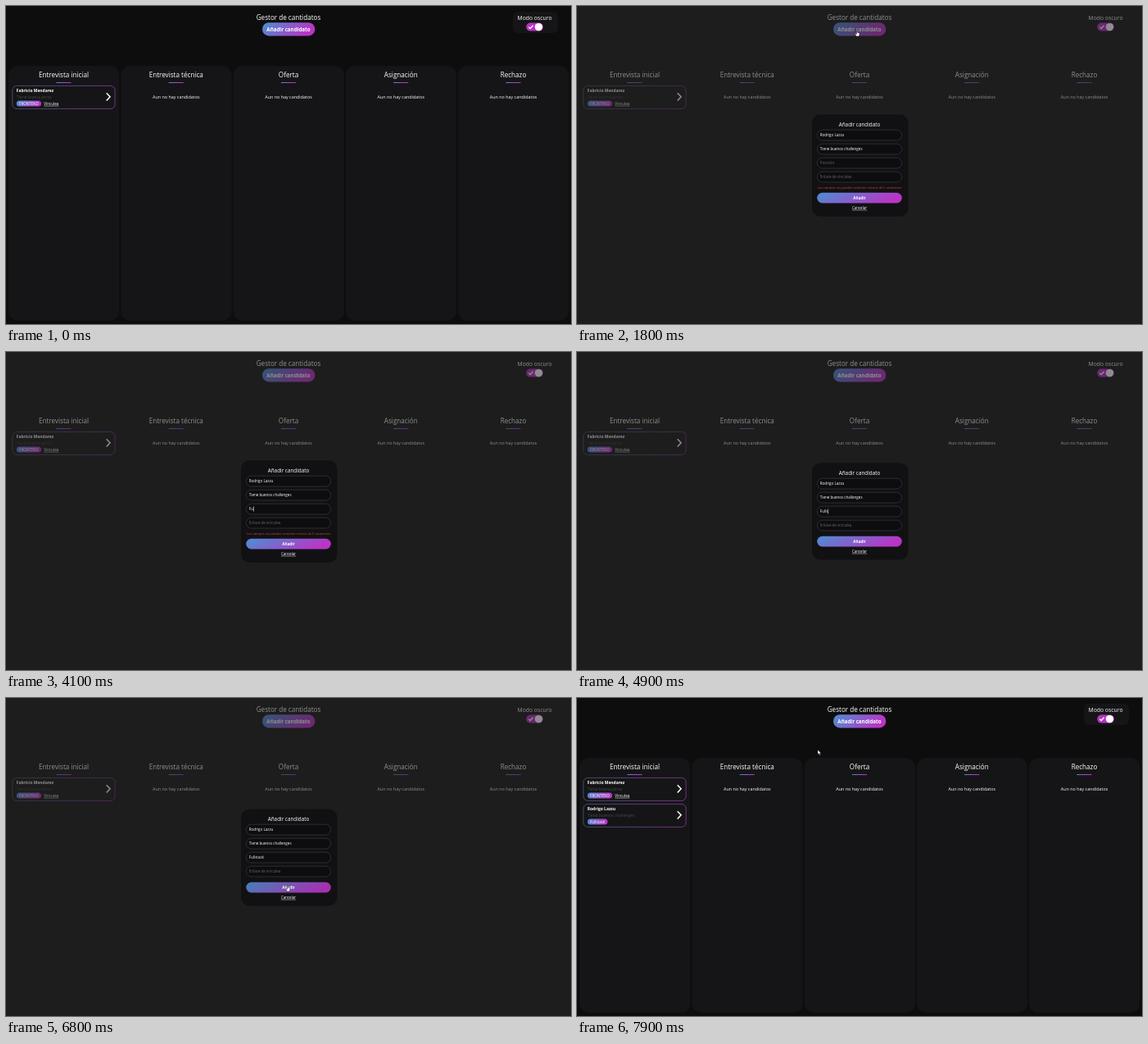
Animation, 690 px wide and 388 px high, one loop 8000 ms. Source, as an HTML page:

```html
<!DOCTYPE html>
<html lang="es">
<meta charset="utf-8">
<title>Gestor de candidatos</title>
<style>
  html, body { margin: 0; width: 100%; height: 100%; overflow: hidden; background: #0d0d0e; }
  svg { display: block; width: 690px; height: 388px; font-family: "Open Sans", "Noto Sans", sans-serif; fill: #fff; }
  .panel { fill: #151517; }
  .open { background: #1d1d1d; }
  .open #page { opacity: .5; }
  .open .panel { fill: none; }
  #modal { visibility: hidden; }
  .open #modal { visibility: visible; }
</style>
<svg id="stage" viewBox="0 0 690 388">
  <defs>
    <linearGradient id="accent" x2="1" y2=".25">
      <stop stop-color="#4a90d2"/><stop offset="1" stop-color="#b935c6"/>
    </linearGradient>
    <linearGradient id="edge">
      <stop stop-color="#4b5a80"/><stop offset="1" stop-color="#8d3a98"/>
    </linearGradient>
  </defs>
  <g id="page"></g>
  <g id="modal"></g>
  <g id="cursor" stroke="#000" stroke-width=".5">
    <path id="arrow" d="M0 0V6L1.4 4.8 2.4 7 3.4 6.5 2.4 4.4H4.2Z"/>
    <path id="hand" d="M-.6 0Q0-.8.6 0V2.3L3 3V5L2.3 7H-.8L-2.4 4.2-1.7 3.6-.6 4.4Z"/>
  </g>
</svg>
<script>
const $ = id => document.getElementById(id);

const text = (x, y, size, str, attrs = '') =>
  `<text x="${x}" y="${y}" font-size="${size}" ${attrs}>${str}</text>`;
const middle = (x, y, size, str, attrs = '') =>
  text(x, y, size, str, 'text-anchor="middle" ' + attrs);
const box = (x, y, w, h, r, attrs) =>
  `<rect x="${x}" y="${y}" width="${w}" height="${h}" rx="${r}" ${attrs}/>`;

const accent = 'fill="url(#accent)"', bold = 'font-weight="700"';
const underline = 'text-decoration="underline"';

const column = (title, i) => {
  const x = 70.5 + 137.25 * i;
  return box(x - 67.5, 73, 135.5, 311, 12, 'class="panel"') +
    middle(x, 87.2, 8.15, title) +
    box(x - 9.2, 92.9, 18.4, 1.1, .5, accent) +
    (i ? middle(x, 112.6, 5.42, 'Aun no hay candidatos') : '');
};

const card = (y, name, note, badge, badgeWidth, link = '') =>
  box(7.8, y + .4, 125.3, 28, 5.5, 'fill="#101013" class="panel" stroke="url(#edge)" stroke-width=".8"') +
  text(12.8, y + 7.8, 4.95, name, bold) +
  text(12.8, y + 15.6, 5.03, note, 'fill="#484848"') +
  box(12.8, y + 18.4, badgeWidth, 7.2, 3.6, accent) +
  middle(12.8 + badgeWidth / 2, y + 23.6, 4.5, badge) +
  text(46.3, y + 23.8, 4.6, link, underline) +
  `<path d="M122.7 ${y + 9.2}l4.4 4.6-4.4 4.6" fill="none" stroke="#fff" stroke-width="1.5"/>`;

$('page').innerHTML =
  middle(345, 16.6, 8.15, 'Gestor de cantidatos') +
  box(313, 20.2, 64.3, 16.2, 8, accent) +
  middle(345, 30.8, 6.2, 'Añadir candidato', bold) +
  box(619, 7, 55, 26, 6, 'class="panel"') +
  middle(645.5, 17, 6.85, 'Modo oscuro') +
  box(635.3, 20.6, 20.6, 10, 5, 'fill="#b633c2"') +
  '<circle cx="650.5" cy="25.6" r="4.7"/>' +
  '<path d="M638.3 25.6l1.9 1.9 3.5-3.8" fill="none" stroke="#fff" stroke-width="1.3"/>' +
  ['Entrevista inicial', 'Entrevista técnica', 'Oferta', 'Asignación', 'Rechazo'].map(column).join('') +
  card(97, 'Fabricio Mendarez', 'Tiene buena pinta', 'FRONTEND', 30.2, 'Vinculea') +
  `<g id="added">${card(129, 'Rodrigo Lazzu', 'Tiene buenos challenges', 'Fullstack', 24.6)}</g>`;

const field = (row, value, attrs = '') => {
  const y = 151.2 + 17 * row;
  return box(293.4, y, 103.2, 12.8, 6.4, 'fill="#0d0d10" stroke="#3a3a40" stroke-width=".7"') +
    text(296.8, y + 8, 4.52, value, attrs);
};
const hint = 'fill="#66666a"';

$('modal').innerHTML =
  box(287, 132.3, 117.5, 124.4, 10, 'id="sheet" fill="#111114"') +
  '<g id="form">' +
  middle(345, 146.5, 6.35, 'Añadir candidato') +
  field(0, 'Rodrigo Lazzu') +
  field(1, 'Tiene buenos challenges') +
  field(2, '', 'id="role"') +
  field(3, 'Enlace de vinculea', hint) +
  box(0, 188.3, .5, 6.4, 0, 'id="caret"') +
  '</g>' +
  middle(345, 223, 3.95, 'Los campos no pueden contener menos de 5 caracteres', 'id="error" fill="#d8432f"') +
  '<g id="actions">' +
  box(293.2, 227.8, 103.6, 12.6, 6.3, 'id="submit" ' + accent) +
  middle(345, 235.8, 4.6, 'Añadir', bold) +
  middle(345, 247.8, 4.5, 'Cancelar', underline) +
  '</g>';

// Time at which each letter of the role is typed
const word = 'Fullstack';
const keyTimes = [3800, 4100, 4400, 4700, 4900, 5000, 5200, 5200, 5400];

// Pointer path: time, x, y
const path = [
  [100, 400, 350], [900, 341, 36], [1100, 342, 30], [1800, 342, 30],
  [2500, 300, 55], [2800, 237, 110], [3100, 358, 210], [3300, 308, 189],
  [6100, 308, 192], [6600, 344, 229], [7000, 344, 229], [7900, 294, 63]
];

function pointer(t) {
  const i = path.findIndex(p => p[0] > t);
  if (i < 0) return path.at(-1).slice(1);
  const [t0, x0, y0] = path[Math.max(i - 1, 0)], [t1, x1, y1] = path[i];
  let k = t1 > t0 ? (t - t0) / (t1 - t0) : 0;
  k = k * k * (3 - 2 * k);
  return [x0 + (x1 - x0) * k, y0 + (y1 - y0) * k];
}

const show = (id, on) => $(id).setAttribute('display', on ? 'inline' : 'none');
const shift = (id, y) => $(id).setAttribute('transform', `translate(0 ${y})`);

function render(t) {
  const open = t >= 1700 && t < 6900;
  $('stage').classList.toggle('open', open);
  document.body.style.background = open ? '#1d1d1d' : '#0d0d0e';
  show('added', t >= 6900);

  const typed = word.slice(0, keyTimes.filter(k => k <= t).length);
  const valid = typed.length >= 5;
  $('role').textContent = typed || 'Posición';
  $('role').setAttribute('fill', typed ? '#fff' : '#66666a');
  show('caret', t >= 3300 && t < 5900);
  $('caret').setAttribute('x', 297 + (typed ? $('role').getComputedTextLength() : 0));

  show('error', !valid);
  shift('form', valid ? 3 : 0);
  shift('actions', valid ? -3 : 0);
  $('sheet').setAttribute('y', valid ? 135.5 : 132.3);
  $('sheet').setAttribute('height', valid ? 118 : 124.4);
  $('submit').setAttribute('opacity', t >= 6500 ? .88 : 1);

  const hand = (t >= 1000 && t < 2000) || (t >= 6500 && t < 6900);
  show('cursor', t >= 100 && (t < 3800 || t >= 6200));
  show('hand', hand);
  show('arrow', !hand);
  $('cursor').setAttribute('transform', `translate(${pointer(t)})`);
}

const start = performance.now();
function tick() {
  render(Math.floor((performance.now() - start) % 8000 / 100) * 100);
  requestAnimationFrame(tick);
}
tick();
</script>
</html>
```
